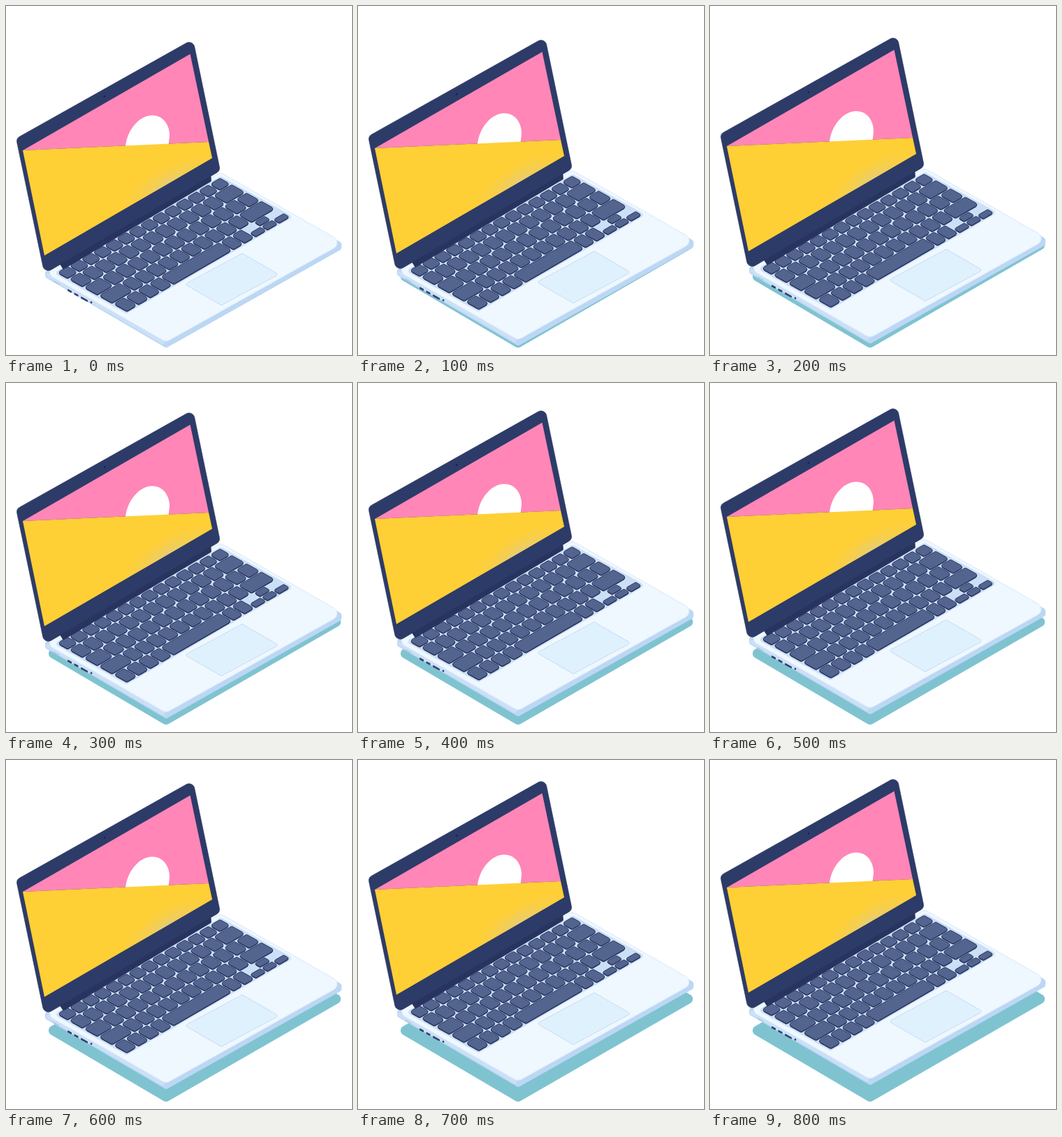
These frames come from a looping animation (495x498 px, 900 ms). An HTML page with a canvas:

```html
<!DOCTYPE html>
<html lang="en">
<head>
<meta charset="utf-8">
<title>Floating laptop</title>
<style>
html, body { margin: 0; width: 100%; height: 100%; overflow: hidden; background: #fff; }
canvas { display: block; width: 495px; height: 498px; }
</style>
</head>
<body>
<canvas id="stage" width="495" height="498"></canvas>
<script>
const ctx = document.getElementById('stage').getContext('2d');

const STEP = 100, STEPS = 9, RISE = 3;
const NAVY = '#2d3b68', INK = '#28345f', KEY = '#53648f', YELLOW = '#ffcf36';

// Builds a polygon with rounded corners and paints it.
function poly(points, r, fill, stroke, width = 1) {
  const n = points.length, last = points[n - 1], first = points[0];
  ctx.beginPath();
  ctx.moveTo((last[0] + first[0]) / 2, (last[1] + first[1]) / 2);
  points.forEach((p, i) => ctx.arcTo(...p, ...points[(i + 1) % n], r));
  ctx.closePath();
  if (fill) { ctx.fillStyle = fill; ctx.fill(); }
  if (stroke) { ctx.strokeStyle = stroke; ctx.lineWidth = width; ctx.stroke(); }
}

function dot(x, y, r, color) {
  ctx.beginPath();
  ctx.arc(x, y, r, 0, Math.PI * 2);
  ctx.fillStyle = color;
  ctx.fill();
}

// Parallelogram from its left, front and right corners.
const slab = (left, front, right) =>
  [left, [left[0] + right[0] - front[0], left[1] + right[1] - front[1]], right, front];

// Keyboard plane: u runs along a row, v runs towards the front edge.
const at = (u, v) => [88 + 16.77 * u + 17.1 * v, 380 - 9.69 * u + 9.5 * v];
const quad = (u0, u1, v0, v1) => [at(u0, v0), at(u1, v0), at(u1, v1), at(u0, v1)];

const ROW_LEFT = -0.5, ROW_RIGHT = 13.5, GAP = 0.12, DEPTH = 1.12;
const rowTop = i => i ? 0.56 + (i - 1) * (DEPTH + GAP) : -0.42;
const rowEnd = i => rowTop(i + 1) - GAP;

function key(u0, u1, v0, v1) {
  const g = GAP / 2, r = v1 - v0 < 0.7 ? 2 : 2.9;
  const shape = quad(u0 + g, u1 - g, v0, v1);
  poly(shape.map(([x, y]) => [x, y + 0.8]), r, INK, INK, 1);
  poly(shape, r, KEY, INK, 0.9);
}

function keys(row, count, u0, u1) {
  const w = (u1 - u0) / count;
  for (let i = 0; i < count; i++) {
    key(u0 + i * w, u0 + (i + 1) * w, rowTop(row), rowEnd(row));
  }
}

// A row of equal keys between a wide first and a wide last key.
function wideRow(row, count, first, last) {
  const a = ROW_LEFT + first, b = ROW_RIGHT - last;
  if (first) keys(row, 1, ROW_LEFT, a);
  keys(row, count, a, b);
  if (last) keys(row, 1, b, ROW_RIGHT);
}

function keyboard() {
  poly(quad(-0.64, 13.62, -0.54, 5.56), 4, '#cbdff6');
  wideRow(0, 14, 0, 0);
  wideRow(1, 12, 0, 1.7);
  wideRow(2, 12, 1.5, 0);
  wideRow(3, 10, 1.9, 2.1);

  keys(4, 4, ROW_LEFT, 3.5);
  keys(4, 1, 3.5, 8.6);
  keys(4, 2, 8.6, 10.5);
  const top = rowTop(4), end = rowEnd(4), mid = (top + end) / 2;
  key(11.5, 12.5, top, mid - GAP / 2);
  for (let u = 10.5; u < ROW_RIGHT; u++) key(u, u + 1, mid + GAP / 2, end);
}

function ports() {
  for (let i = 0; i < 4; i++) dot(69 + i * 2.1, 393 + i * 1.2, 0.7, '#8ba3c8');
  for (let i = 0; i < 3; i++) {
    const x = 88 + i * 9.5, y = 403.5 + i * 5.3, w = i < 2 ? 6 : 10, h = w * 0.56;
    poly([[x, y], [x + w, y + h], [x + w, y + h + 3], [x, y + 3]], 1, '#34416d');
  }
  dot(122, 423, 1.4, '#34416d');
}

function base() {
  poly([[56, 379], [307, 238], [480, 338], [480, 347], [229, 488], [56, 387]], 4, '#bcd7f4');
  poly([[57, 379], [227, 478], [227, 485], [57, 386]], 3, '#cbe0f7');
  poly(slab([53, 379], [229, 479.5], [483, 338]), 9, '#eff7ff', '#d8eafb');
  ports();
  keyboard();
  poly(slab([256, 397], [308, 427], [390, 383]), 2, '#e0f1fe', '#c5dcf4');
}

function glow() {
  ctx.save();
  ctx.clip();
  ctx.translate(231, 254);
  ctx.rotate(-Math.PI / 6);
  ctx.scale(1, 0.33);
  const g = ctx.createRadialGradient(0, 0, 0, 0, 0, 76);
  g.addColorStop(0, 'rgba(222, 205, 140, 0.75)');
  g.addColorStop(1, 'rgba(240, 207, 90, 0)');
  ctx.fillStyle = g;
  ctx.fillRect(-76, -76, 152, 152);
  ctx.restore();
}

function lid() {
  poly([[76, 367], [293, 240], [294, 250], [82, 376]], 2, INK);
  poly([[14.5, 189], [267.5, 47.5], [306.5, 235], [55, 382]], 8, NAVY, INK, 0.6);

  poly([[24, 206], [263.5, 68.5], [290, 194]], 0, '#ff86b7');

  ctx.beginPath();
  ctx.moveTo(171, 200);
  ctx.bezierCurveTo(173, 177, 191, 156, 209, 156);
  ctx.bezierCurveTo(226, 156, 234, 171, 234, 185);
  ctx.lineTo(232.5, 198);
  ctx.fillStyle = '#fff';
  ctx.fill();

  poly([[24, 206], [290, 194], [295, 217], [55, 356]], 0, YELLOW);
  glow();
  dot(141, 129, 1.3, '#17214a');
}

function draw(time) {
  const step = Math.floor(time / STEP) % STEPS;
  ctx.fillStyle = '#fff';
  ctx.fillRect(0, 0, 495, 498);
  if (step > 0) poly(slab([54, 386], [229, 488.5], [486, 341]), 7, '#7fc3d1');
  ctx.save();
  ctx.translate(0, -RISE * step);
  base();
  lid();
  ctx.restore();
}

function tick() {
  draw(performance.now());
  requestAnimationFrame(tick);
}
tick();
</script>
</body>
</html>
```
